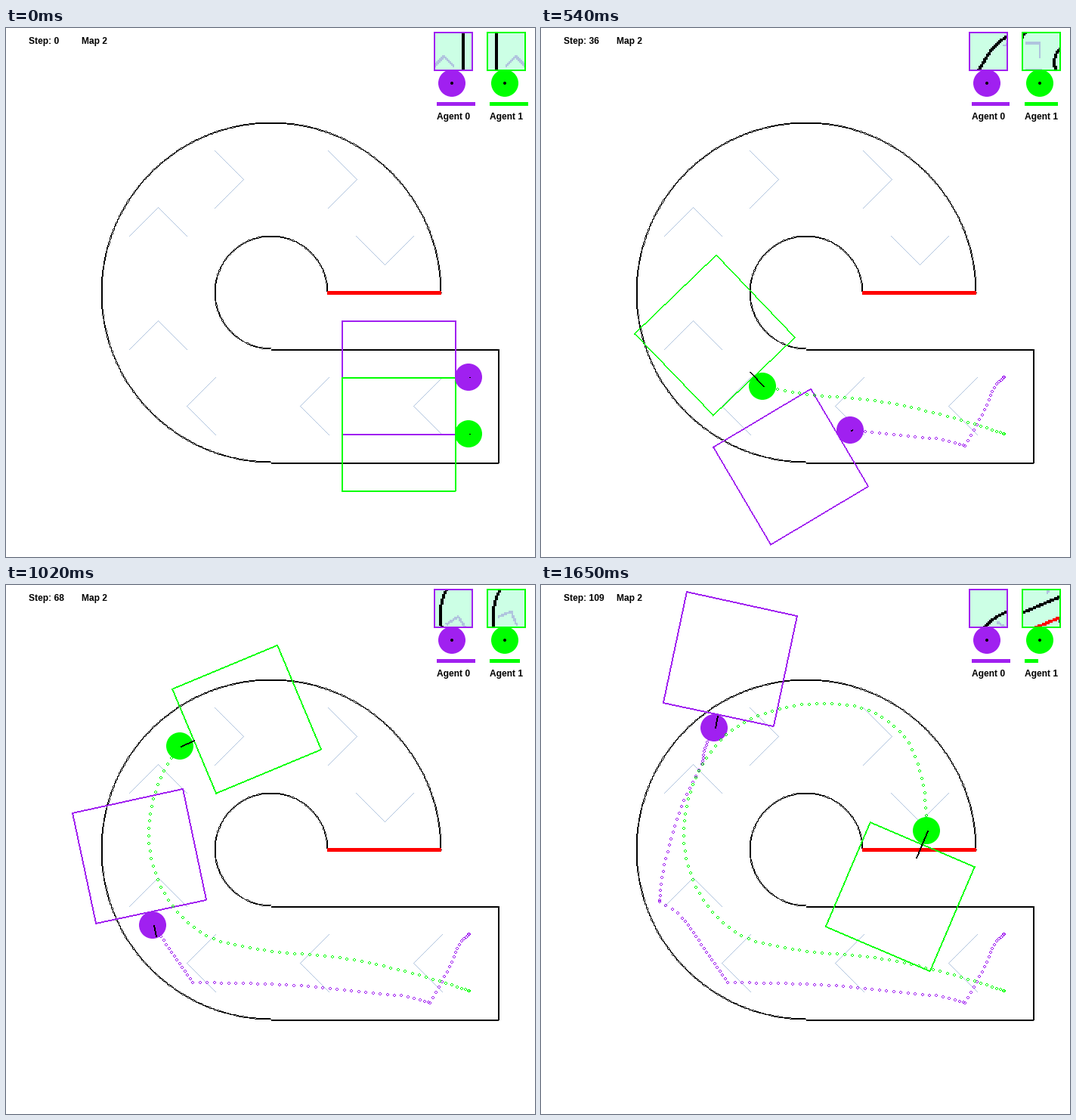
Animation, 700 px wide and 700 px high, one loop 1680 ms. Source, as a matplotlib script:

```python
import numpy as np
import matplotlib.pyplot as plt
from matplotlib.animation import FuncAnimation
from matplotlib.patches import Circle, Rectangle

SIZE, FRAMES, LAST = 700, 56, 109
PX = 0.72                       # one pixel in points at 100 dpi
PURPLE = (160 / 255, 32 / 255, 240 / 255)
GREEN = (0, 1, 0)
STEEL = (176 / 255, 196 / 255, 222 / 255)
MINT = (204 / 255, 1, 229 / 255)
MID, OUTER, INNER = 350, 225, 75
BODY, GAP, REACH, CELLS = 18, 18.75, 150, 25

WALL = [(350, 425), (650, 425), (650, 575), (350, 575)]
FINISH = [(425, 350), (575, 350)]


def chevron(x, y, dx, dy, a=38):
    """Arrow with its tip at (x, y), pointing along (dx, dy)."""
    bx, by = x - a * dx, y - a * dy
    return [(bx + a * dy, by - a * dx), (x, y), (bx - a * dy, by + a * dx)]


CHEVRONS = ([chevron(x, 500, -1, 0) for x in (538, 388, 238)]
            + [chevron(200, y, 0, -1) for y in (387, 237)]
            + [chevron(x, 200, 1, 0) for x in (313, 463)]
            + [chevron(500, 313, 0, 1)])


def curve(points):
    """Dense smooth curve through a few points."""
    p = np.array(points, float)
    k = np.r_[0, np.cumsum(np.hypot(*np.diff(p, axis=0).T))]
    m = np.gradient(p, k, axis=0)
    t = np.linspace(0, k[-1], 1500)
    i = np.clip(np.searchsorted(k, t, "right") - 1, 0, len(k) - 2)
    h = (k[i + 1] - k[i])[:, None]
    s = (t - k[i])[:, None] / h
    return ((1 + 2 * s) * (1 - s) ** 2 * p[i] + s * (1 - s) ** 2 * h * m[i]
            + s * s * (3 - 2 * s) * p[i + 1] + s * s * (s - 1) * h * m[i + 1])


def track(*legs):
    """Position at every step. A leg speeds up towards its top speed with
    time constant lag; each new leg starts at a bounce."""
    pos = np.zeros((LAST + 1, 2))
    for start, end, lag, points in legs:
        c = curve(points)
        length = np.r_[0, np.cumsum(np.hypot(*np.diff(c, axis=0).T))]
        t = np.arange(end - start + 1)
        gone = t - lag * (1 - np.exp(-t / lag))
        gone *= length[-1] / gone[-1]
        for axis in (0, 1):
            pos[start:end + 1, axis] = np.interp(gone, length, c[:, axis])
    return np.round(pos)


def ramp(*values):
    """Linear change between shared key steps."""
    return np.interp(np.arange(LAST + 1), (0, 28, 46, 58, 78, 92, 109), values)


purple_path = track(
    (0, 18, 6, [(612, 462), (605, 468), (585, 508), (560, 553)]),
    (18, 53, 2, [(560, 553), (541, 547), (482, 540), (410, 532), (340, 528),
                 (246, 526)]),
    (53, 69, 0.1, [(246, 526), (190, 445)]),
    (69, 74, 0.5, [(190, 445), (180, 434), (156, 419)]),
    (74, 97, 1.5, [(156, 419), (158, 395), (169, 344), (195, 270), (212, 237)]),
    (97, 109, 0.1, [(212, 237), (217, 214), (229, 189)]))

green_path = track(
    (0, 109, 3.2, [(612, 537), (552, 518), (453, 495), (323, 480), (266, 465),
                   (215, 418), (188, 338), (200, 265), (243, 199), (314, 164),
                   (373, 157), (433, 166), (481, 202), (503, 256),
                   (510, 325)]))


def axes_of(turn):
    """Forward and right unit vectors on screen for a heading in degrees."""
    a = np.radians(turn)
    return np.array([np.cos(a), -np.sin(a)]), np.array([np.sin(a), np.cos(a)])


def near(x, y, pts, width):
    """Mask of the places within width of a polyline."""
    mask = np.zeros(x.shape, bool)
    for (px, py), (qx, qy) in zip(pts, pts[1:]):
        dx, dy = qx - px, qy - py
        s = ((x - px) * dx + (y - py) * dy) / (dx * dx + dy * dy)
        s = np.clip(s, 0, 1)
        mask |= np.hypot(x - px - s * dx, y - py - s * dy) < width
    return mask


def camera(pos, turn, other, tint):
    """Coarse picture of what lies in the square ahead."""
    fwd, right = axes_of(turn)
    c = (np.arange(CELLS) + 0.5) * REACH / CELLS
    u, d = np.meshgrid(c - REACH / 2, REACH - c + GAP)
    x = pos[0] + 0.5 + d * fwd[0] + u * right[0]
    y = pos[1] + 0.5 + d * fwd[1] + u * right[1]
    img = np.empty((CELLS, CELLS, 3))
    img[:] = MINT
    for pts in CHEVRONS:
        img[near(x, y, pts, 5)] = STEEL
    r = np.hypot(x - MID, y - MID)
    ring = (abs(r - OUTER) < 6) | (abs(r - INNER) < 6)
    img[ring & ~((x > MID) & (y > MID))] = 0
    img[near(x, y, WALL, 6)] = 0
    img[near(x, y, FINISH, 6)] = (1, 0, 0)
    img[np.hypot(x - other[0], y - other[1]) < BODY] = tint
    return img


fig = plt.figure(figsize=(7, 7), dpi=100, facecolor="white")
ax = fig.add_axes([0, 0, 1, 1])
ax.axis("off")


def trace(pts, width=1):
    """Hard-edged pixels of a polyline, thickened across its main direction."""
    pts = np.floor(np.array(pts, float))
    out = []
    for p, q in zip(pts, pts[1:]):
        d = q - p
        n = int(abs(d).max())
        pix = np.round(p + np.linspace(0, 1, n + 1)[:, None] * d)
        across = (0, 1) if abs(d[0]) > abs(d[1]) else (1, 0)
        out += [pix + i * np.array(across) for i in range(width)]
    return np.concatenate(out).T


def pixels(xy, color, z):
    return ax.plot(*xy, ls="none", marker=",", color=color, zorder=z)[0]


def disk(x, y, r, color, z):
    return ax.add_patch(Circle((x - 0.5, y - 0.5), r, fc=color, ec="none",
                               zorder=z))


def bar(x, y, width, color, z):
    return ax.add_patch(Rectangle((x, y), width, 5, fc=color, ec="none",
                                  zorder=z))


def label(x, y, s):
    return ax.text(x, y, s, family="Liberation Sans", weight="bold",
                   size=12 * PX, va="baseline", ha="left", zorder=20)


# Pixel ring, four wide, that marks one past position
grid = np.stack(np.meshgrid(np.arange(-2, 2), np.arange(-2, 2)), -1)
grid = grid.reshape(-1, 2)
dist = np.hypot(*(grid + 0.5).T)
RING = grid[(dist > 1) & (dist < 2)]

for pts in CHEVRONS:
    pixels(trace(pts), STEEL, 1)
for radius in (OUTER, INNER):
    for r in (radius, radius - 1):
        th = np.arange(0, 1.5 * np.pi, 2 / r)
        arc = np.column_stack([MID + r * np.cos(th), MID - r * np.sin(th)])
        pixels(trace(arc), "black", 2)
pixels(trace(WALL, 2), "black", 2)
bar(424.5, 347.5, 151, "red", 2)


class Agent:
    def __init__(self, n, color, path, turn, push, energy):
        self.color, self.path = color, path
        self.turn, self.push, self.energy = turn, push, energy
        z, left = 4 + 4 * n, 566.5 + 70 * n
        self.box = pixels(([], []), color, 3)
        self.trail = pixels(([], []), color, z)
        self.body = disk(0, 0, BODY, color, z + 1)
        self.arrow = pixels(([], []), "black", z + 2)
        self.view = ax.imshow(np.ones((CELLS, CELLS, 3)), aspect="auto",
                              interpolation="nearest", zorder=15,
                              extent=(left, left + 50, 55.5, 5.5))
        ax.add_patch(Rectangle((left, 5.5), 50, 50, fc="none", ec=color,
                               lw=2 * PX, zorder=16))
        disk(left + 23.5, 73, BODY, color, 17)
        disk(left + 23.5, 73, 2, "black", 18)
        self.bar = bar(left + 3, 97.5, 51, color, 17)
        label(left + 3.5, 120, f"Agent {n}")

    def show(self, step, other):
        pos = self.path[step]
        fwd, right = axes_of(self.turn[step])
        a = pos + 0.5 + fwd * GAP
        b, side = a + fwd * REACH, right * REACH / 2
        self.box.set_data(*trace([a - side, b - side, b + side, a + side,
                                  a - side], 2))
        past = self.path[:step + 1, None] + RING
        self.trail.set_data(*past.reshape(-1, 2).T)
        self.body.center = tuple(pos - 0.5)
        tip = pos + 0.5 + fwd * self.push[step]
        self.arrow.set_data(*trace([pos, tip], 2))
        self.bar.set_width(round(self.energy[step]))
        self.view.set_data(camera(pos, self.turn[step], other.path[step],
                                  other.color))


agents = [Agent(0, PURPLE, purple_path,
                turn=ramp(180, 168, 264, 108, 96, 84, 78),
                push=ramp(0, 3, -8, -10, -21, -9, 16),
                energy=ramp(51, 51, 48, 51, 51, 46, 51)),
          Agent(1, GREEN, green_path,
                turn=ramp(180, 168, 91, 54, -8.5, -62.6, -113),
                push=ramp(0, 25, 27, 17, 22, 22, 39),
                energy=ramp(51, 46, 42, 40, 39, 35, 18))]
counter = label(30, 20, "")
label(100, 20, "Map 2")
ax.set_xlim(-0.5, SIZE - 0.5)
ax.set_ylim(SIZE - 0.5, -0.5)


def draw(frame):
    step = min(2 * frame, LAST)
    counter.set_text(f"Step: {step}")
    agents[0].show(step, agents[1])
    agents[1].show(step, agents[0])
    return []


anim = FuncAnimation(fig, draw, frames=FRAMES, interval=30, repeat=True,
                     repeat_delay=0)
plt.show()
```
